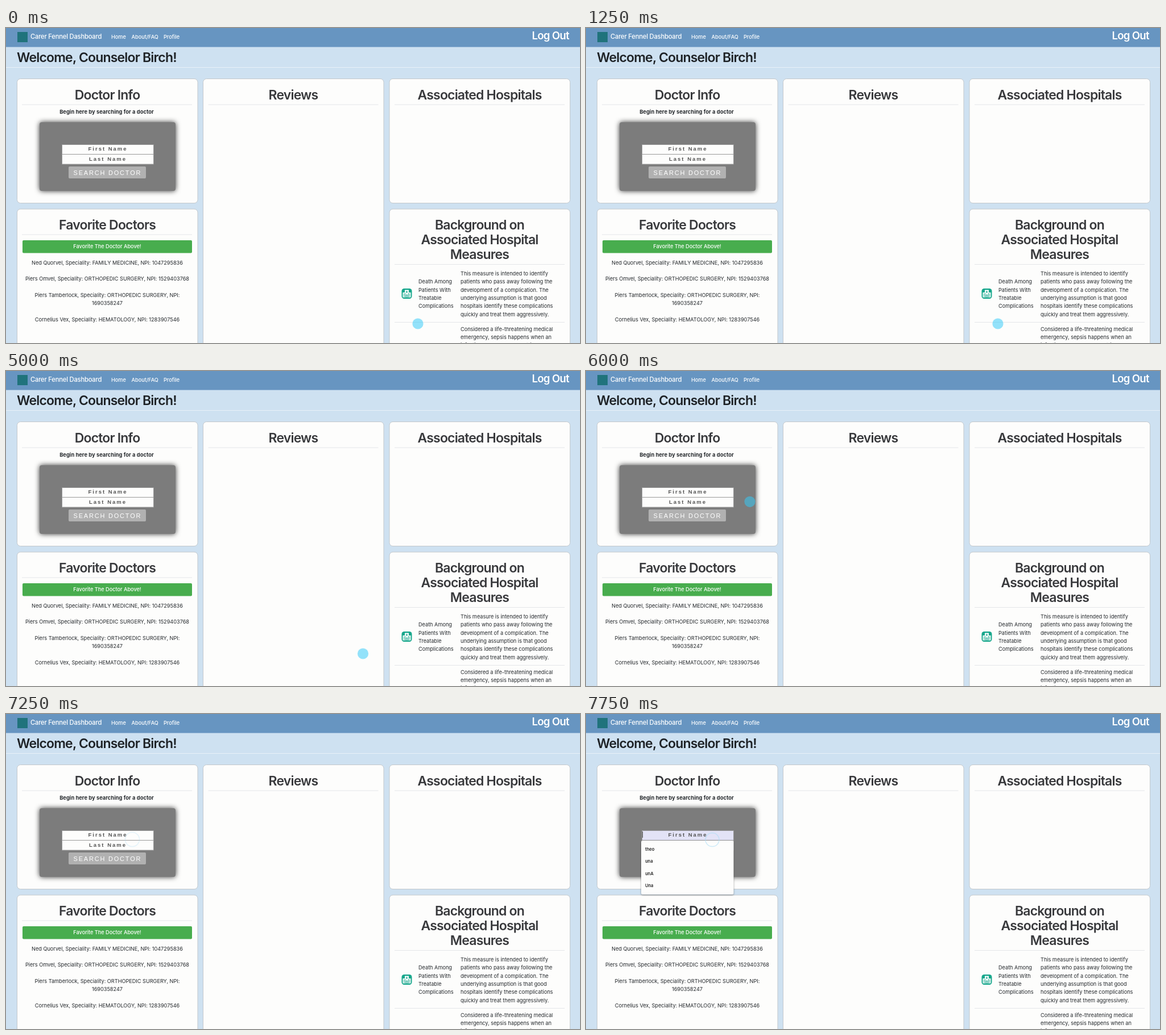
These frames come from a looping animation (1009x555 px, 8000 ms). An HTML page:

```html
<!DOCTYPE html>
<html lang="en">
<head>
<meta charset="utf-8">
<title>Dashboard</title>
<style>
  html, body { margin: 0; width: 100%; height: 100%; overflow: hidden; background: #cee1f1; }
  svg { display: block; width: 1009px; height: 555px; }
  text { font: 9.2px Inter, "Open Sans", sans-serif; letter-spacing: -.03px; fill: #25292d; font-optical-sizing: none; }
  .mid { text-anchor: middle; }
  .title { font-size: 23px; font-weight: 600; letter-spacing: -.82px; fill: #38393c; }
  .welcome { fill: #1e2226; }
  .light { fill: #fff; font-weight: 500; }
  .brand { font-size: 11.2px; letter-spacing: -.2px; }
  .logout { font-size: 18.5px; font-weight: 600; letter-spacing: -.68px; }
  .lead { font-size: 9.3px; font-weight: 700; letter-spacing: .04px; }
  .field { font: bold 9.5px "Liberation Sans", Arial, sans-serif; letter-spacing: 2px; fill: #545454; }
  .search { font: 11px "Liberation Sans", Arial, sans-serif; letter-spacing: 1.8px; fill: #fff; }
  .option { font-size: 7.5px; font-weight: 600; letter-spacing: 0; fill: #222; }
  .card { fill: #fdfdfc; stroke: #c3c8cc; }
  .rule { stroke: #e4e6e9; }
  .input { fill: #fdfdfc; stroke: #999; }
  .panel { fill: #7c7c7c; filter: drop-shadow(0 0 5px rgba(0, 0, 0, .8)); }
  .menu { fill: #fdfdfc; filter: drop-shadow(0 1px 1.5px rgba(0, 0, 0, .4)); }
</style>
</head>
<body>
<svg viewBox="0 0 1009 555">
  <rect width="1009" height="555" fill="#cee1f1"/>
  <rect width="1009" height="33.5" fill="#6795c1"/>
  <path d="M0 69.5H1009" stroke="#e9f1f8"/>

  <rect x="20" y="7" width="18" height="18" fill="#20737c"/>
  <text class="light brand" x="43" y="19">Carer Fennel Dashboard</text>
  <text class="light" x="185" y="18.5">Home</text>
  <text class="light" x="220.5" y="18.5">About/FAQ</text>
  <text class="light" x="277" y="18.5">Profile</text>
  <text class="light logout" x="924.5" y="20">Log Out</text>
  <text class="title welcome" x="19" y="60">Welcome, Counselor Birch!</text>

  <g id="cards"></g>

  <text class="title mid" x="178" y="126">Doctor Info</text>
  <text class="title mid" x="505" y="126">Reviews</text>
  <text class="title mid" x="832.5" y="126">Associated Hospitals</text>
  <text class="title mid" x="178" y="355">Favorite Doctors</text>
  <text class="lead mid" x="177" y="150.5">Begin here by searching for a doctor</text>

  <rect class="panel" x="59" y="166" width="239" height="121" rx="4"/>
  <rect id="first" class="input" x="98.5" y="205.5" width="161" height="17"/>
  <rect class="input" x="98.5" y="222.5" width="161" height="17.5"/>
  <text class="field" x="144.5" y="216">First Name</text>
  <text class="field" x="146" y="234">Last Name</text>
  <rect x="110" y="244" width="136" height="21" rx="2" fill="#b1b1b1"/>
  <text class="search" x="118.5" y="258.5">SEARCH DOCTOR</text>

  <rect x="29" y="374" width="298" height="22.5" rx="2" fill="#48ad4e"/>
  <text class="light mid" x="178" y="388">Favorite The Doctor Above!</text>
  <g id="doctors"></g>

  <g id="measures"></g>
  <g transform="translate(695 459)" fill="none" stroke="#18a78c">
    <rect x=".5" width="18" height="18" rx="4.5" fill="#18a78c" stroke="none"/>
    <path d="M2.5 15.5V7H6V2.5H13V7H16.5V15.5Z" fill="#fff" stroke="none"/>
    <path d="M9.5 4V8M7.5 6H11.5M6.5 8V15M12.5 8V15M8.5 15.5V11H10.5V15.5M4.5 9V11M4.5 12V14M14.5 9V11M14.5 12V14"/>
  </g>

  <g id="menu">
    <rect class="menu" x="97" y="223" width="162.5" height="95" rx="2.5"/>
    <path d="M99.5 207V218" stroke="#555"/>
  </g>
  <circle id="dot" r="9.6" fill="rgb(53,202,247)" fill-opacity=".53"/>
  <circle id="ring" fill="none" stroke="#a9dcf5" stroke-width="1.6"/>
</svg>
<script>
const $ = id => document.getElementById(id);

function add(parent, tag, attrs, content = '') {
  const el = document.createElementNS('http://www.w3.org/2000/svg', tag);
  for (const key in attrs) el.setAttribute(key, attrs[key]);
  el.textContent = content;
  parent.append(el);
}

function lines(parent, x, y, gap, cls, rows) {
  rows.forEach((row, i) => add(parent, 'text', { x, y: y + i * gap, class: cls }, row));
}

const cards = [[19.5, 89.5, 219], [346.5, 89.5, 500], [674, 89.5, 219], [19.5, 319, 300], [674, 319, 300]];
for (const [x, y, height] of cards) {
  add($('cards'), 'rect', { x, y, width: 317.5, height, rx: 6, class: 'card' });
}
for (const [x, y] of [[28, 135], [355.5, 135], [683, 135], [28, 364], [683, 416.5], [683, 518.5]]) {
  add($('cards'), 'path', { d: `M${x} ${y}h299`, class: 'rule' });
}

lines($('doctors'), 178, 416.5, 28.6, 'mid', [
  'Ned Quorvel, Speciality: FAMILY MEDICINE, NPI: 1047295836',
  'Piers Omvel, Speciality: ORTHOPEDIC SURGERY, NPI: 1529403768',
  'Piers Tamberlock, Speciality: ORTHOPEDIC SURGERY, NPI:'
]);
lines($('doctors'), 178, 488.2, 28.6, 'mid', [
  '1690358247',
  'Cornelius Vex, Speciality: HEMATOLOGY, NPI: 1283907546'
]);

const measures = $('measures');
lines(measures, 832.5, 355, 26.2, 'title mid', ['Background on', 'Associated Hospital', 'Measures']);
lines(measures, 725, 450.2, 14.3, '', ['Death Among', 'Patients With', 'Treatable', 'Complications']);
lines(measures, 799, 436, 14.3, '', [
  'This measure is intended to identify',
  'patients who pass away following the',
  'development of a complication. The',
  'underlying assumption is that good',
  'hospitals identify these complications',
  'quickly and treat them aggressively.'
]);
lines(measures, 799, 533.7, 14.3, '', [
  'Considered a life-threatening medical',
  'emergency, sepsis happens when an',
  'infection you already have triggers a'
]);
lines($('menu'), 104, 241, 21.4, 'option', ['theo', 'una', 'unA', 'Una']);

// Pointer: start time, x, y, then ring radius and opacity while pressed
const steps = [
  [0, 724, 521], [4250, 724, 521.6], [4500, 720, 522.5], [4750, 711.7, 526],
  [5000, 627.5, 498], [5250, 564, 469.5], [5500, 521.5, 440.5], [5750, 352.5, 255.5],
  [6000, 288, 230.3], [6250, 236.5, 211.5], [6500, 236.5, 212],
  [6750, 236, 223, 12.5, .6], [7000, 236, 222.5, 12.5, .4],
  [7250, 222, 221, 12.5, .28], [7500, 222, 221.5, 12, .55]
];
const LOOP = 8000, MENU_AT = 7500;

function draw() {
  const t = performance.now() % LOOP;
  const [, x, y, r, opacity] = steps.findLast(s => s[0] <= t);
  const pointer = r ? $('ring') : $('dot');
  pointer.setAttribute('cx', x);
  pointer.setAttribute('cy', y);
  if (r) {
    pointer.setAttribute('r', r);
    pointer.style.opacity = opacity;
  }
  $('dot').style.display = r ? 'none' : '';
  $('ring').style.display = r ? '' : 'none';

  const open = t >= MENU_AT;
  $('menu').style.display = open ? '' : 'none';
  $('first').style.fill = open ? '#e3e3f6' : '';
  requestAnimationFrame(draw);
}
draw();
</script>
</body>
</html>
```
